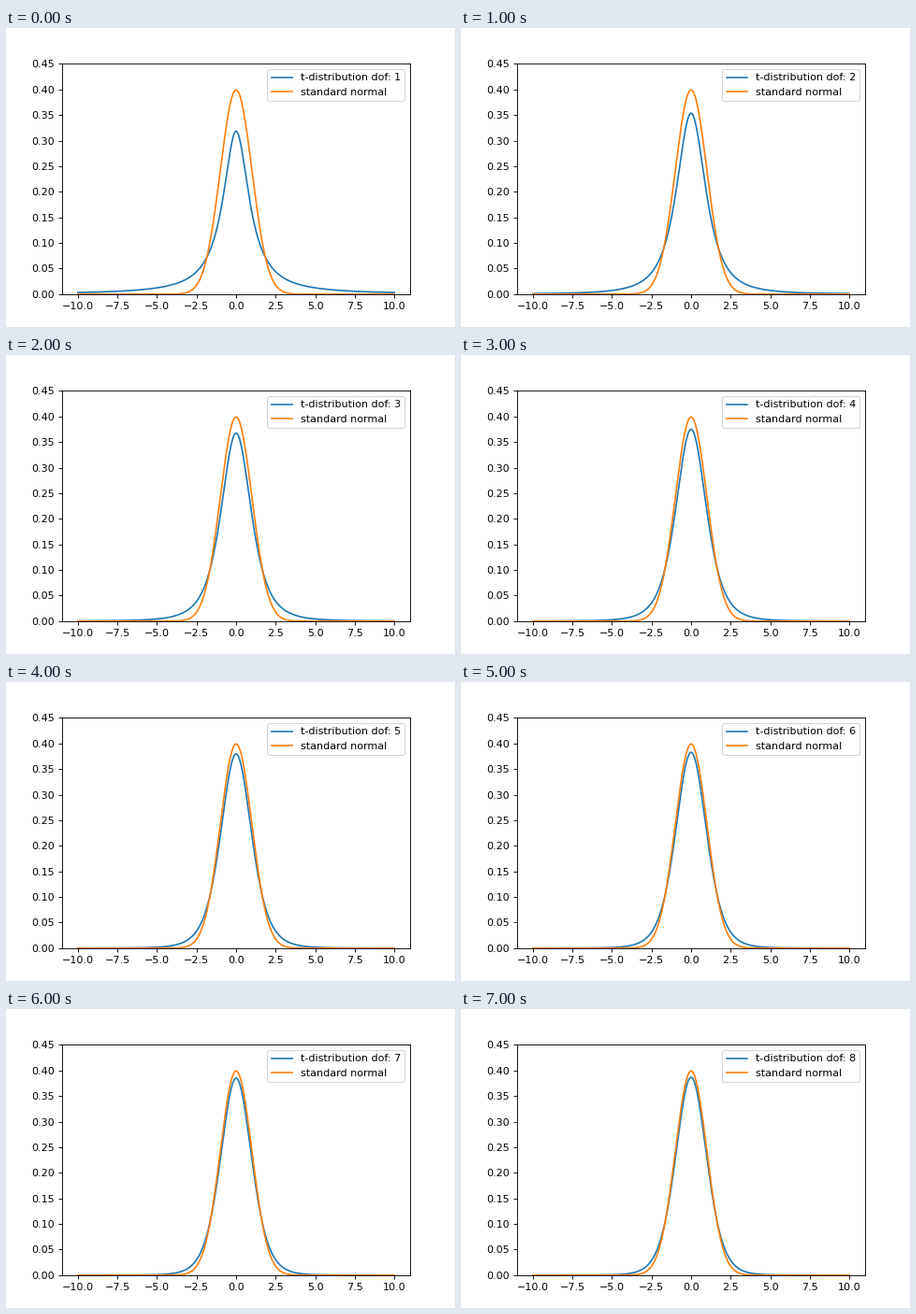
Write a matplotlib script that moves like this. It is 480 px wide and 320 px high and loops after 8 s.

```python
import math

import matplotlib.pyplot as plt
import numpy as np
from matplotlib.animation import FuncAnimation

MAX_DOF = 8
x = np.linspace(-10, 10, 1000)


def t_pdf(x, dof):
    scale = math.gamma((dof + 1) / 2) / (math.sqrt(dof * math.pi) * math.gamma(dof / 2))
    return scale * (1 + x**2 / dof) ** (-(dof + 1) / 2)


def normal_pdf(x):
    return np.exp(-x**2 / 2) / math.sqrt(2 * math.pi)


fig, ax = plt.subplots(figsize=(6, 4), dpi=80)
t_line, = ax.plot(x, t_pdf(x, 1), label="t-distribution dof: 1")
ax.plot(x, normal_pdf(x), label="standard normal")
ax.set_xlim(-11, 11)
ax.set_ylim(0, 0.45)
legend = ax.legend(loc="upper right")
t_label = legend.get_texts()[0]


def update(frame):
    dof = frame + 1
    t_line.set_ydata(t_pdf(x, dof))
    t_label.set_text(f"t-distribution dof: {dof}")
    return t_line, t_label


anim = FuncAnimation(fig, update, frames=MAX_DOF, interval=1000,
                     repeat=True, repeat_delay=0, blit=False)
plt.show()
```
